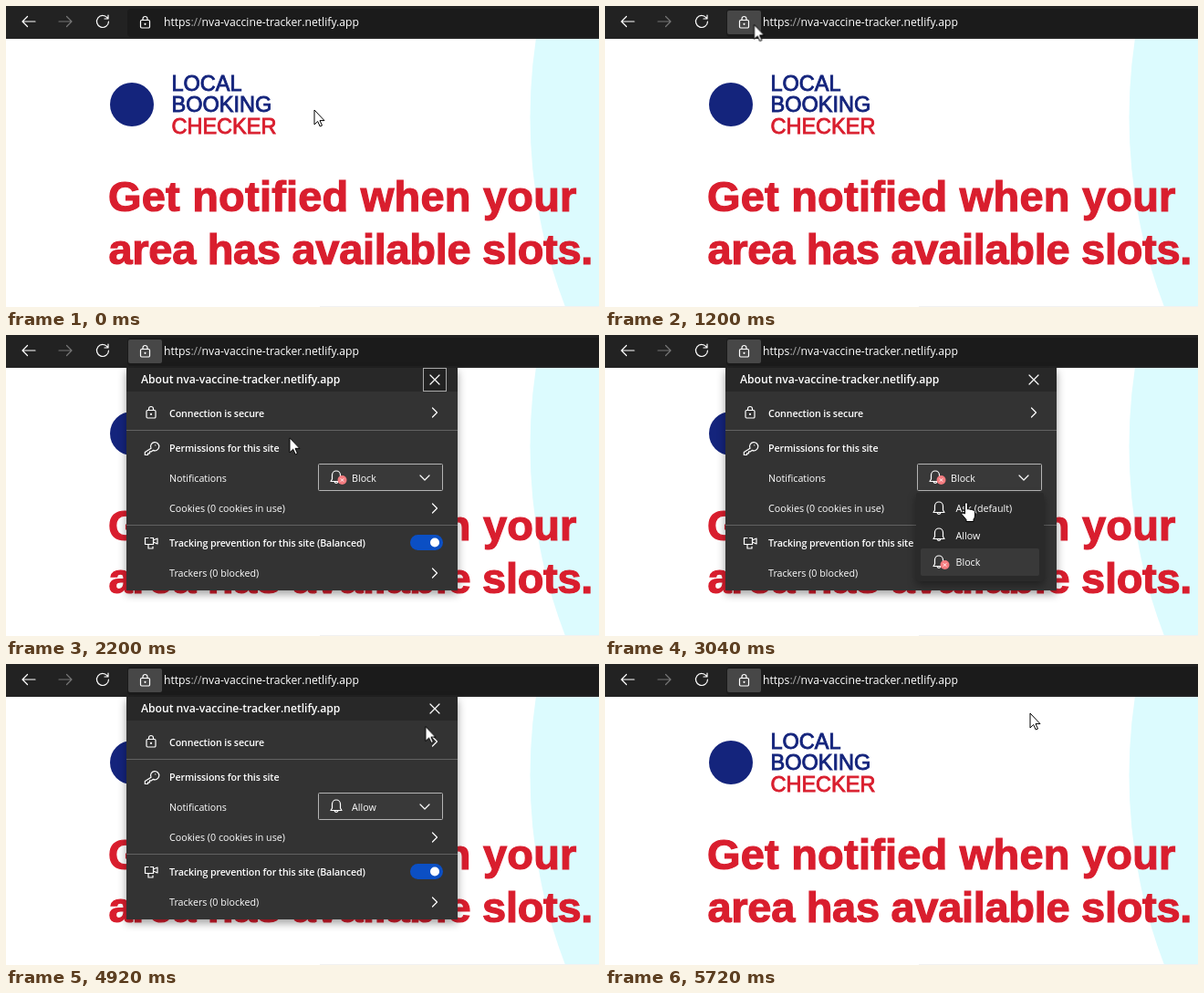
An HTML page for the animation above (5.76 s loop, 650 px wide and 330 px high).

```html
<!DOCTYPE html>
<html lang="en">
<head>
<meta charset="utf-8">
<title>Allow site notifications</title>
<style>
  html, body { margin: 0; width: 100%; height: 100%; overflow: hidden; background: #fff; }
  svg { display: block; width: 650px; height: 330px; }
  text { font-family: "Open Sans", "Noto Sans", sans-serif; fill: #fff; white-space: pre; }
  .url { font-size: 12.2px; font-weight: 500; }
  .ui text { font-size: 10.7px; }
  .ui .bold { font-weight: 600; letter-spacing: -.12px; }
  .ui .title { font-size: 12.2px; font-weight: 600; letter-spacing: -.03px; }
  .head text { font: bold 47px "Liberation Sans", Arial, sans-serif; fill: #d91e2e; stroke: #d91e2e; stroke-width: 1.2; }
  .name text { font: 23.5px "Liberation Sans", Arial, sans-serif; fill: #14247c; stroke: #14247c; stroke-width: .9; }
  .name .red { fill: #d91e2e; stroke: #d91e2e; }
  .line { fill: none; stroke: #fff; stroke-width: 1.2; stroke-linecap: round; stroke-linejoin: round; }
  .rule { stroke: #626262; }
  .shadow { filter: drop-shadow(0 4px 5px rgba(0, 0, 0, .38)); }

  /* One loop: 5760 ms, 1% = 57.6 ms */
  .a { animation: 5760ms linear infinite; }
  .step { animation-timing-function: step-end; }
  .hot { animation-name: hot; }
  .panel { animation-name: panel; }
  .late { animation-name: late; }
  .shift { animation-name: shift; }
  .focus { animation-name: focus; }
  .menu { animation-name: menu; }
  .before { animation-name: before; }
  .after { animation-name: after; }
  .close { animation-name: close; }
  .arrow { animation-name: arrow; }
  .pointer { animation-name: pointer; animation-timing-function: ease-in-out; }

  @keyframes hot { 0% { visibility: hidden } 8.33%, 100% { visibility: visible } }
  @keyframes panel {
    0%, 27.08% { opacity: 0; transform: translateY(-9px) }
    29.17%, 95.83% { opacity: 1; transform: none }
    96.53% { opacity: .87; transform: translateY(-3px) }
    97.22% { opacity: .5; transform: translateY(-6px) }
    98.26%, 100% { opacity: 0; transform: translateY(-9px) }
  }
  @keyframes late { 0% { visibility: hidden } 30.55%, 100% { visibility: visible } }
  @keyframes shift { 0% { transform: translateY(-40px) } 30.55%, 100% { transform: none } }
  @keyframes focus { 0% { visibility: visible } 45.83%, 100% { visibility: hidden } }
  @keyframes menu { 0% { visibility: hidden } 46.87% { visibility: visible } 67.7%, 100% { visibility: hidden } }
  @keyframes arrow { 0% { visibility: visible } 46.87% { visibility: hidden } 67.7%, 100% { visibility: visible } }
  @keyframes before { 0% { visibility: visible } 67.7%, 100% { visibility: hidden } }
  @keyframes after { 0% { visibility: hidden } 67.7%, 100% { visibility: visible } }
  @keyframes close { 0% { visibility: hidden } 86.8%, 100% { visibility: visible } }
  @keyframes pointer {
    0%, 1% { transform: translate(338px, 114px) }
    10.4% { transform: translate(167px, 25px) }
    18%, 22.5% { transform: translate(163.5px, 20.5px) }
    28.5%, 32.6% { transform: translate(163.5px, 34.5px) }
    42.4% { transform: translate(400px, 160px) }
    46.5% { transform: translate(402px, 162px) }
    51.5%, 52.8% { transform: translate(396px, 184px) }
    57.6%, 67% { transform: translate(404px, 218px) }
    72%, 78.1% { transform: translate(404px, 219px) }
    87.5%, 96.5% { transform: translate(466px, 52px) }
    98.5%, 100% { transform: translate(466px, 54px) }
  }
</style>
</head>
<body>
<svg viewBox="0 0 650 330">
  <defs>
    <g id="lock" class="line">
      <rect x="-5" y="-2.5" width="10" height="8.5" rx="1.2"/>
      <path d="M-2.5-2.5V-4a2.5 2.5 0 0 1 5 0V-2.5"/>
      <circle cy="1.8" r=".5" fill="#fff"/>
    </g>
    <path id="next" class="line" d="M-2.5-5 2.5 0-2.5 5"/>
    <path id="down" class="line" d="M-5-2.5 0 2.5 5-2.5"/>
    <path id="back" class="line" d="M7 0H-7M-1.5-5.5-7 0-1.5 5.5"/>
    <g id="bell" class="line">
      <path d="M-4.5 2V-2.5a4.5 4.5 0 0 1 9 0V2L6 4.5H-6Z"/>
      <path d="M-1.8 5a1.9 1.9 0 0 0 3.6 0"/>
    </g>
    <g id="muted">
      <use href="#bell"/>
      <circle cx="6.5" cy="3" r="5" fill="#f47c80"/>
      <path d="M4.8 1.3l3.4 3.4m0-3.4-3.4 3.4" stroke="#fff" stroke-width=".9"/>
    </g>
  </defs>

  <rect width="650" height="330" fill="#fff"/>
  <circle cx="1155" cy="122" r="580.5" fill="#dcfbfe"/>
  <path d="M344 329.5H650" stroke="#f1f1f1"/>

  <circle cx="138" cy="108" r="24" fill="#14247c"/>
  <g class="name">
    <text x="181.5" y="92.5">LOCAL</text>
    <text x="181.5" y="116">BOOKING</text>
    <text x="181.5" y="139.5" class="red">CHECKER</text>
  </g>
  <g class="head">
    <text x="112" y="225" letter-spacing=".2">Get notified when your</text>
    <text x="112.5" y="283" letter-spacing="-.31">area has available slots.</text>
  </g>

  <rect width="650" height="36" fill="#222"/>
  <path d="M650 3H137a4 4 0 0 0-4 4V30a4 4 0 0 0 4 4H650" fill="#1b1b1b"/>
  <rect class="a step hot" x="134" y="5" width="37" height="26" rx="2" fill="#474747"/>
  <use href="#back" x="25" y="17"/>
  <use href="#back" transform="translate(65 17) scale(-1 1)" opacity=".38"/>
  <path class="line" d="M111.5 13.5A6.5 6.5 0 1 0 112.5 17M112 10V14H108"/>
  <use href="#lock" x="152.5" y="18"/>
  <text class="url" x="173" y="21.5">https<tspan fill="#aaa">://</tspan>nva-vaccine-tracker.netlify.app</text>

  <g class="a panel ui">
    <g class="shadow">
      <rect x="132" y="36" width="363" height="69" fill="#333"/>
      <rect class="a step shift" x="132" y="104" width="363" height="176" fill="#333"/>
    </g>
    <rect x="132" y="36" width="363" height="26" fill="#282828"/>
    <text class="title" x="148" y="53">About nva-vaccine-tracker.netlify.app</text>
    <rect class="a step focus" x="457.5" y="36.5" width="25" height="25" fill="#222" stroke="#aaa"/>
    <rect class="a step close" x="457" y="36" width="26" height="26" rx="2" fill="#404040"/>
    <path class="line" d="M465 44l10 10m0-10-10 10"/>

    <g class="a step late">
      <use href="#lock" x="159" y="85"/>
      <text class="bold" x="179" y="89.5">Connection is secure</text>
      <use href="#next" x="470" y="85"/>
      <path class="rule" d="M132 104.5H495"/>
    </g>

    <g class="a step shift">
      <path class="line" d="M159 124.2a4.6 4.6 0 1 1 2.2 2.2l-1.7 1.4h-2v2h-2v1.7h-3.2v-3ZM163.7 120.8h.1"/>
      <text class="bold" x="179" y="127.5">Permissions for this site</text>
      <text x="179" y="160.5">Notifications</text>
      <rect x="342.5" y="141.5" width="136" height="29" rx="1" fill="#393939" stroke="#b4b4b4"/>
      <g class="a step before">
        <use href="#muted" x="362" y="156"/>
        <text x="379" y="160.5">Block</text>
      </g>
      <g class="a step after">
        <use href="#bell" x="362" y="156"/>
        <text x="379" y="160.5">Allow</text>
      </g>
      <use href="#down" x="459" y="156.5"/>
      <text x="179" y="194">Cookies (0 cookies in use)</text>
      <use href="#next" x="470" y="190"/>
      <path class="rule" d="M132 208.5H495"/>
      <path class="line" d="M156 222.5h-3.5v7h9v-7h-3M161.5 225l4.5-2v6l-4.5-2M156 229.5v4.5h5v-2"/>
      <text class="bold" x="179" y="232">Tracking prevention for this site (Balanced)</text>
      <rect x="443" y="219" width="36" height="17" rx="8.5" fill="#0b4fc4"/>
      <circle cx="470" cy="227.5" r="5" fill="#fff"/>
      <text x="179" y="265">Trackers (0 blocked)</text>
      <use href="#next" x="470" y="261"/>
    </g>

    <g class="a step menu">
      <rect class="shadow" x="341" y="173" width="140" height="97" rx="2" fill="#2a2a2a"/>
      <rect x="346" y="234" width="130" height="30" rx="2" fill="#393939"/>
      <use href="#bell" x="366" y="190"/>
      <text x="384.5" y="194">Ask (default)</text>
      <use href="#bell" x="366" y="219"/>
      <text x="384.5" y="223.5">Allow</text>
      <use href="#muted" x="366" y="249"/>
      <text x="384.5" y="253">Block</text>
    </g>
  </g>

  <g class="a pointer" fill="#fff" stroke="#000" stroke-linejoin="round">
    <path class="a step arrow" d="M0 0V16L3.7 12.5 6.2 18 8.5 17 6 11.6H11Z"/>
    <path class="a step menu" d="M-1.5 1.2a1.5 1.5 0 0 1 3 0V7q1.5-1 3 .5 1.5-.8 2.7 .6 2-.5 2.3 1.5V14q0 2.5-1.5 4v2.5H0V18.5L-5 12.5q0-2.5 3.5-.5Z"/>
  </g>
</svg>
</body>
</html>
```
